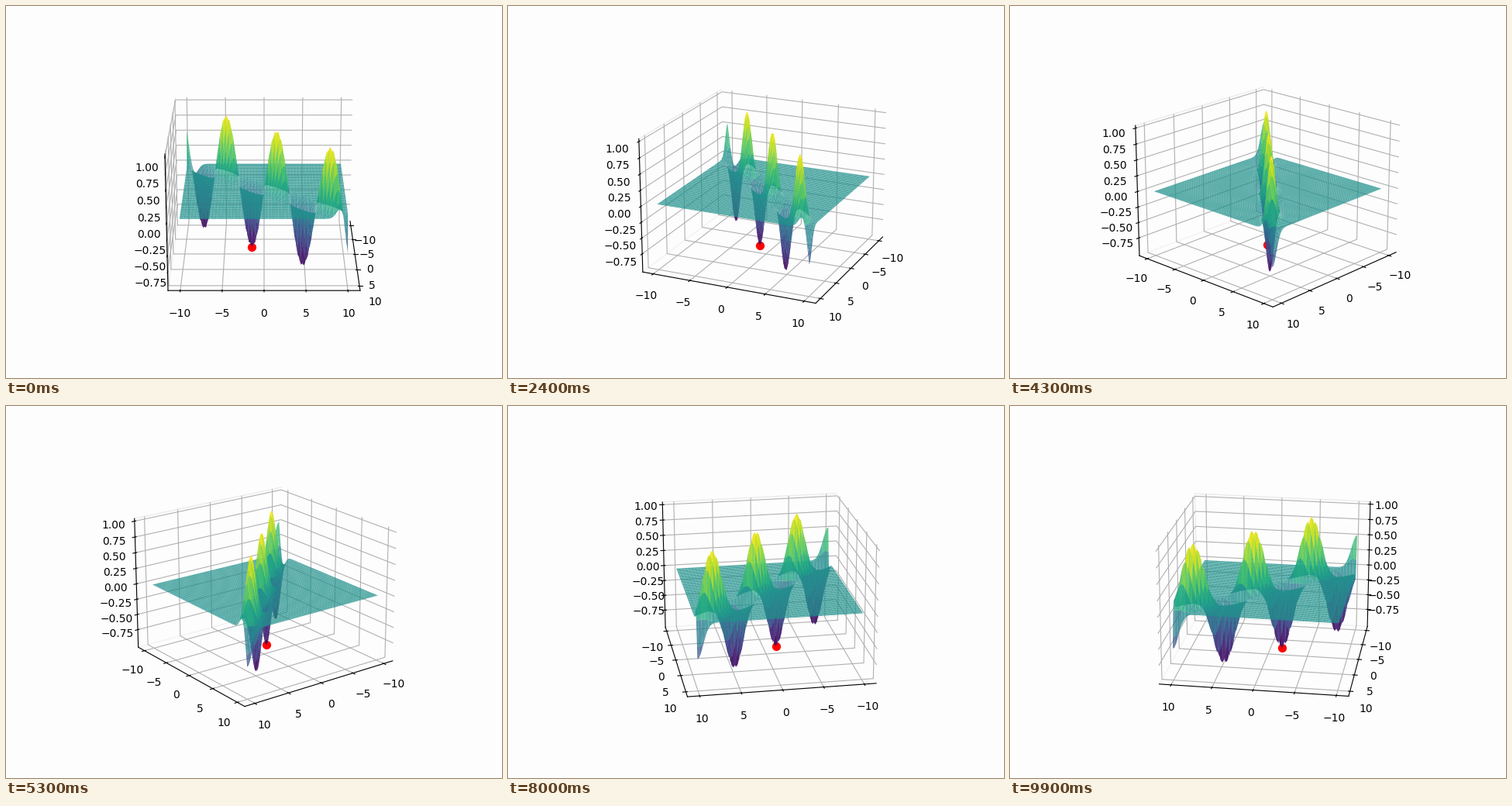
A matplotlib script that plays this animation: 640 by 480 pixels, repeating every 10 s.

```python
import numpy as np
import matplotlib.pyplot as plt
from matplotlib.animation import FuncAnimation

BACK = "#fdfdfd"
FRAMES = 100
ELEV = 20

fig = plt.figure(figsize=(6.4, 4.8), dpi=100, facecolor=BACK)
ax = fig.add_subplot(projection="3d", facecolor=BACK)

# A sine wave along the diagonal with a Gaussian cross-section
side = np.linspace(-10, 10, 100)
X, Y = np.meshgrid(side, side)
Z = np.sin(Y) * np.exp(-(X - Y) ** 2)
ax.plot_surface(X, Y, Z, cmap="viridis", alpha=0.8)

low = -np.pi / 2
ax.scatter([low], [low], [-1], color="red", s=50)

# 5 % data margin in the plane, then a thin rim around the whole box
rim = 25 / 24
ax.set_xlim(-11 * rim, 11 * rim)
ax.set_ylim(-11 * rim, 11 * rim)
ax.set_zlim(-rim, rim)
ax.set_xticks(np.arange(-10, 11, 5))
ax.set_yticks(np.arange(-10, 11, 5))
ax.set_zticks(np.arange(-0.75, 1.01, 0.25))

for axis, edge in ((ax.xaxis, BACK), (ax.yaxis, "#ececec"), (ax.zaxis, "#f4f4f4")):
    axis.set_pane_color((253 / 255, 253 / 255, 253 / 255, 1))
    axis.pane.set_edgecolor(edge)


def update(i):
    # A hair above zero keeps the choice of back panes unambiguous
    ax.view_init(elev=ELEV, azim=max(i, 1e-3))
    return ()


anim = FuncAnimation(fig, update, frames=FRAMES, interval=100,
                     init_func=lambda: update(0), repeat=True, repeat_delay=0)
plt.show()
```
